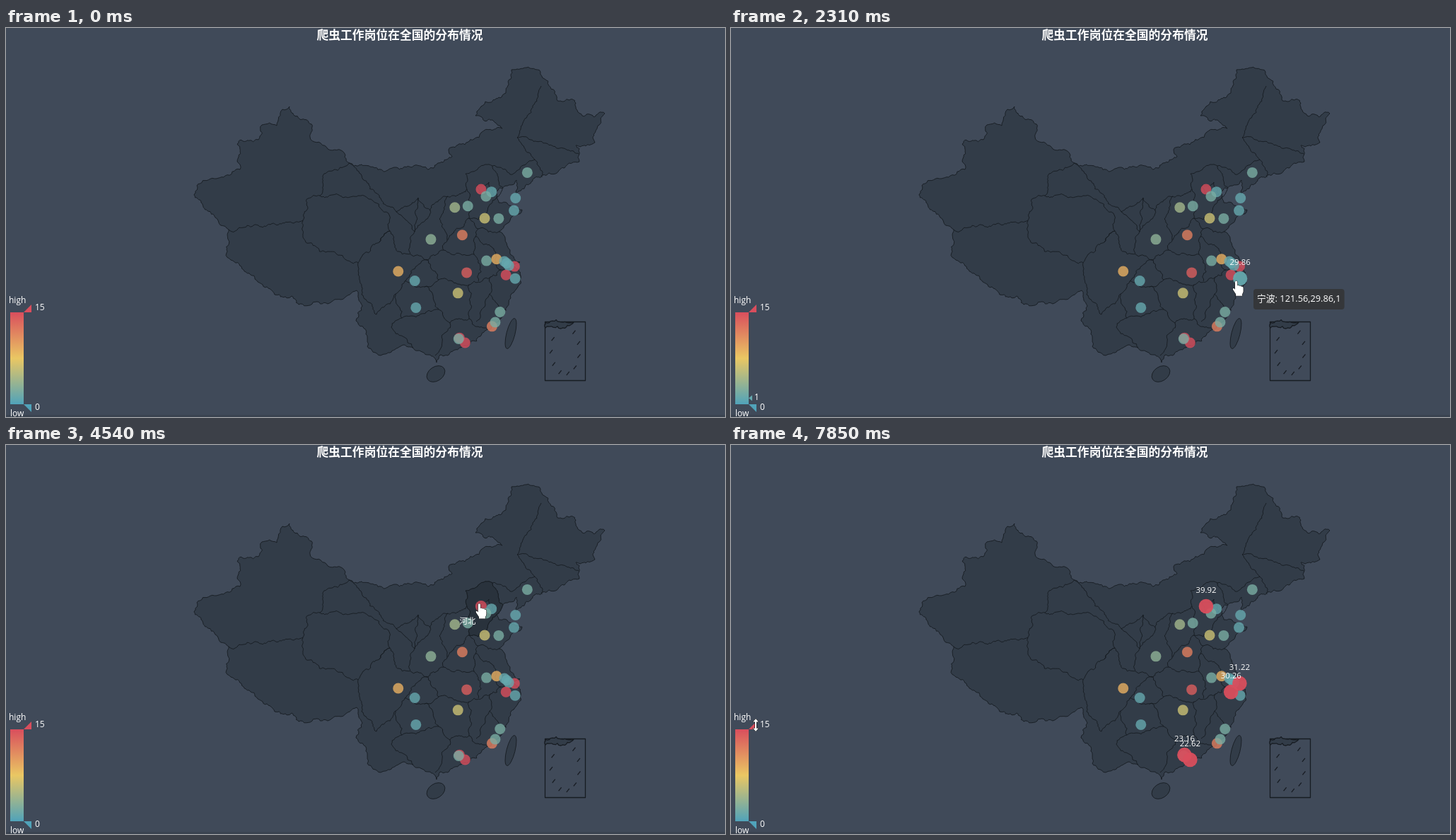
An HTML page with a canvas that plays this animation: 1017 by 550 pixels, repeating every 8000 ms.

```html
<!DOCTYPE html>
<html lang="zh">
<head>
<meta charset="utf-8">
<style>
html, body { margin: 0; width: 100%; height: 100%; overflow: hidden; background: #404a59; }
canvas { display: block; }
</style>
</head>
<body>
<canvas id="stage" width="1017" height="550"></canvas>
<script>
const W = 1017, H = 550, LOOP = 8000, STEP = 77;
const ctx = document.getElementById('stage').getContext('2d');
const SANS = '"Open Sans", "Noto Sans CJK SC", sans-serif';
const LAND = '#323c48', LAND_HOVER = '#29323c', LINE = '#171c22';

// Key points only; rough() adds the fine detail
const COAST = `266,236 270,223 310,209 331,200 327,164 357,158 362,137 383,138 391,115 401,111 408,124
433,140 430,154 474,173 486,191 540,201 605,198 631,182 626,172 662,157 672,148 702,142 690,132 664,124
678,104 707,92 715,59 736,56 756,62 779,101 806,106 815,124 847,121 832,149 833,162 806,166 811,189
768,205 721,235 722,215 693,233 697,247 730,257 697,288 727,331 718,336 728,350 724,366 700,411 671,436
614,462 609,473 598,462 562,448 530,463 511,450 509,433 495,414 504,393 496,371 455,390 414,391 404,379
380,377 318,328 312,318 315,285 296,268 276,247`;
const HEBEI = '650,206 688,195 703,226 693,241 668,271 655,269 652,228';
const CAPITAL = '667,222 683,218 690,236 672,236';
const BORDERS = [
  '486,191 450,206 444,237 427,241 420,272',
  '315,285 350,279 420,272 424,303 452,317 498,332 503,377',
  '444,237 498,237 541,262 543,287 528,303 505,320 498,332',
  '486,191 513,220 552,260 572,250 583,240 578,288 552,260',
  '583,240 600,258 625,238 652,228',
  '528,303 543,287 556,316 597,328',
  '600,258 578,288 572,319',
  '625,238 615,275 624,300 645,282 655,269 668,284 697,288',
  '624,300 619,314 597,328 612,356 655,363 685,352 700,342 718,336',
  '668,284 664,295 662,320 672,345 668,358',
  '619,314 662,320',
  '664,295 690,312 700,342',
  '597,328 564,358 592,366 612,356',
  '503,377 524,405 551,376 564,358',
  '551,376 560,410 612,398 602,373 592,366',
  '560,410 545,423 576,452',
  '612,398 628,417 607,463',
  '628,417 655,411 684,428',
  '655,363 655,411',
  '685,352 684,376 665,415',
  '684,376 708,399',
  '688,195 713,207 748,186 758,211',
  '748,186 723,155 742,158 811,179',
  '723,155 748,106 757,82'
];

const parse = s => s.split(/\s+/).map(p => p.split(',').map(Number));

// Midpoint displacement; the offset does not depend on direction
function bend(a, b, out) {
  const len = Math.hypot(b[0] - a[0], b[1] - a[1]);
  if (len < 3.5) return out.push(b);
  const [p, q] = a[0] > b[0] || (a[0] === b[0] && a[1] > b[1]) ? [b, a] : [a, b];
  const n = Math.sin(p[0] * 12.99 + p[1] * 78.23 + q[0] * 37.72 + q[1] * 9.15) * 43758.5;
  const k = (n - Math.floor(n) - 0.5) * Math.min(len * 0.45, 7) / len;
  const mid = [(p[0] + q[0]) / 2 - (q[1] - p[1]) * k, (p[1] + q[1]) / 2 + (q[0] - p[0]) * k];
  bend(a, mid, out);
  bend(mid, b, out);
}

function rough(text, closed) {
  const pts = parse(text);
  if (closed) pts.push(pts[0]);
  const out = [pts[0]], path = new Path2D();
  for (let i = 1; i < pts.length; i++) bend(pts[i - 1], pts[i], out);
  out.forEach(p => path.lineTo(p[0], p[1]));
  if (closed) path.closePath();
  return path;
}

function island(...oval) {
  const path = new Path2D();
  path.ellipse(...oval, 0, Math.PI * 2);
  return path;
}

const hebei = rough(HEBEI, true), capital = rough(CAPITAL, true);
const land = [rough(COAST, true), island(714, 432, 6, 22, 0.25), island(608, 489, 14, 10, -0.6)];
const borders = [...BORDERS.map(s => rough(s)), hebei, capital];

// Longitude, latitude, number of jobs
const cities = {
  沈阳: [123.38, 41.8, 2], 北京: [116.46, 39.92, 15], 唐山: [118.02, 39.63, 1], 天津: [117.2, 39.13, 2],
  大连: [121.62, 38.92, 1], 太原: [112.53, 37.87, 4], 石家庄: [114.48, 38.03, 2], 烟台: [121.39, 37.52, 1],
  济南: [117, 36.65, 6], 潍坊: [119.1, 36.62, 2], 西安: [108.95, 34.27, 3], 郑州: [113.65, 34.76, 12],
  成都: [104.06, 30.67, 9], 合肥: [117.27, 31.86, 2], 南京: [118.78, 32.04, 9], 上海: [121.48, 31.22, 15],
  常州: [119.95, 31.79, 1], 无锡: [120.29, 31.59, 1], 苏州: [120.62, 31.32, 1], 杭州: [120.19, 30.26, 15],
  宁波: [121.56, 29.86, 1], 武汉: [114.31, 30.52, 14], 重庆: [106.54, 29.59, 1], 长沙: [113, 28.21, 6],
  贵阳: [106.71, 26.57, 1], 福州: [119.3, 26.08, 2], 厦门: [118.1, 24.46, 12], 泉州: [118.58, 24.93, 2],
  广州: [113.23, 23.16, 15], 深圳: [114.07, 22.62, 15], 佛山: [113.11, 23.05, 2]
};
const names = Object.keys(cities);
const top15 = names.filter(n => cities[n][2] === 15);

function place(name) {
  const [lon, lat] = cities[name];
  return [679.6 + (lon - 117.27) * 9.45, 228 + (39.92 - lat) * 12.54];
}

// Hover start, end, city, pointer offset from the dot
const visits = [
  [970, 1200, '合肥', 6, -5], [1200, 1400, '南京', 3, 0], [1400, 1600, '无锡', 0, 0], [1600, 1740, '苏州', 0, 0],
  [1740, 2150, '上海', 0, 0], [2160, 2460, '宁波', -6, 3], [2760, 2830, '福州', 0, 0], [2860, 3150, '厦门', -6, 12],
  [3250, 3530, '深圳', 0, 0], [3920, 4250, '济南', 0, 0], [4530, 5100, '北京', -3, -4]
];
const legendHovers = [[6430, 7160], [7330, LOOP]];

const pointer = visits.flatMap(([from, to, name, dx, dy]) => {
  const [x, y] = place(name);
  return [[from, x + dx, y + dy], [to - 30, x + dx, y + dy]];
}).concat([
  [150, 880, 540], [880, 656, 340], [3780, 662, 250],
  [5890, 20, 394], [6000, 29, 395], [6140, 32, 394], [6440, 35, 396]
]).sort((a, b) => a[0] - b[0]);

function pointerAt(t) {
  const i = pointer.findIndex(k => k[0] > t);
  if (i < 1) return pointer[i ? pointer.length - 1 : 0].slice(1);
  const a = pointer[i - 1], b = pointer[i], k = (t - a[0]) / (b[0] - a[0]);
  return [a[1] + (b[1] - a[1]) * k, a[2] + (b[2] - a[2]) * k];
}

function elastic(k) {
  if (k <= 0) return 0;
  if (k >= 1) return 1;
  return 2 ** (-10 * k) * Math.sin((k - 0.1) * 5 * Math.PI) + 1;
}

const STOPS = [[80, 163, 186], [234, 199, 99], [217, 78, 93]];
function colour(v) {
  const p = v / 7.5, i = Math.min(1, Math.floor(p));
  return `rgb(${STOPS[i].map((c, j) => Math.round(c + (STOPS[i + 1][j] - c) * (p - i)))})`;
}

function label(c, text, x, y, size, align = 'left', weight = 500) {
  c.font = `${weight} ${size}px ${SANS}`;
  c.textAlign = align;
  c.textBaseline = 'middle';
  c.fillStyle = '#fff';
  c.fillText(text, x, y);
}

function polygon(c, text, fill) {
  c.beginPath();
  parse(text).forEach(p => c.lineTo(p[0], p[1]));
  c.closePath();
  c.fillStyle = fill;
  c.fill();
}

function drawInset(c) {
  c.lineWidth = 1.3;
  c.strokeRect(762.5, 415.5, 57, 83);
  const shore = rough('763,424 785,425 803,416 763,416', true);
  c.fill(shore);
  c.stroke(shore);
  for (let i = 0; i < 9; i++) {
    const a = -0.9 + i * 0.57;
    const x = 791 + 20 * Math.cos(a), y = 456 + 33 * Math.sin(a);
    c.beginPath();
    c.moveTo(x - 2, y + 2.5);
    c.lineTo(x + 2, y - 2.5);
    c.stroke();
  }
}

function drawLegend(c) {
  const bar = c.createLinearGradient(0, 532, 0, 402);
  STOPS.forEach((s, i) => bar.addColorStop(i / 2, `rgb(${s})`));
  c.fillStyle = bar;
  c.fillRect(6, 402, 19, 130);
  polygon(c, '25,402 36,402 36,391', colour(15));
  polygon(c, '25,532 36,532 36,543', colour(0));
  label(c, 'high', 4, 386, 12);
  label(c, 'low', 6, 546, 12);
  label(c, '15', 41, 396, 12);
  label(c, '0', 41, 537, 12);
}

function makeBase() {
  const base = document.createElement('canvas');
  base.width = W;
  base.height = H;
  const c = base.getContext('2d');
  c.fillStyle = '#404a59';
  c.fillRect(0, 0, W, H);
  c.fillStyle = '#3a4350';
  c.fillRect(0, 547, W, 3);
  c.fillStyle = LAND;
  c.strokeStyle = LINE;
  c.lineWidth = 0.9;
  c.lineJoin = 'round';
  land.forEach(p => { c.fill(p); c.stroke(p); });
  borders.forEach(p => c.stroke(p));
  drawInset(c);
  drawLegend(c);
  label(c, '爬虫工作岗位在全国的分布情况', 557, 12, 16.8, 'center', 700);
  return base;
}
const base = makeBase();

const during = (t, [from, to]) => t >= from && t < to;

function growth(t, name) {
  const spans = visits.filter(v => v[2] === name);
  if (top15.includes(name)) spans.push(...legendHovers);
  return spans.reduce((sum, [from, to]) => sum + elastic((t - from) / 400) - elastic((t - to) / 400), 0);
}

function drawDot(t, name, alpha) {
  ctx.globalAlpha = alpha;
  ctx.fillStyle = colour(cities[name][2]);
  ctx.beginPath();
  ctx.arc(...place(name), 7.5 + 2.8 * growth(t, name), 0, 7);
  ctx.fill();
  ctx.globalAlpha = 1;
}

function drawTip(t, name) {
  const text = `${name}: ${cities[name]}`;
  const [px, py] = pointerAt(t - 90);
  const x = Math.round(px + 25), y = Math.round(py + 12);
  ctx.font = `500 12.8px ${SANS}`;
  ctx.fillStyle = 'rgba(50,50,50,0.8)';
  ctx.beginPath();
  ctx.roundRect(x, y, ctx.measureText(text).width + 10, 29, 4);
  ctx.fill();
  label(ctx, text, x + 5, y + 14.5, 12.8);
}

function drawMark(value) {
  const y = 532 - 130 * value / 15;
  polygon(ctx, `25,${y} 30,${y - 4} 30,${y + 4}`, colour(value));
  label(ctx, String(value), 33, y - 0.5, 12);
}

function drawHebei() {
  ctx.strokeStyle = LINE;
  ctx.lineWidth = 0.9;
  for (const [path, fill] of [[hebei, LAND_HOVER], [capital, LAND]]) {
    ctx.fillStyle = fill;
    ctx.fill(path);
    ctx.stroke(path);
  }
}

const ARROW = new Path2D('M0 0V16L3.6 12.6L6 18L8.4 17L6 11.6H11Z');
const HAND = new Path2D('M-1.2 1.5Q.5 -1 2.2 1.5V7Q4 6 5 7.6Q7 6.8 7.8 8.5Q10.5 8 10.5 10.5V15Q10.5 17 9 19V21.5H0V19L-4 13Q-5 10.5 -2.7 10.8L-1.2 12.5Z');
const RESIZE = new Path2D('M0 -9L4 -4.5H1V4.5H4L0 9L-4 4.5H-1V-4.5H-4Z');

function drawPointer(t, x, y) {
  const overMap = ctx.isPointInPath(land[0], x, y);
  const shape = t >= 6430 ? RESIZE : overMap ? HAND : ARROW;
  ctx.save();
  ctx.translate(x, y);
  ctx.fillStyle = '#fff';
  ctx.strokeStyle = '#000';
  ctx.lineWidth = 1;
  ctx.stroke(shape);
  ctx.fill(shape);
  ctx.restore();
}

function draw(t) {
  ctx.drawImage(base, 0, 0);
  const [px, py] = pointerAt(t);
  const visit = visits.find(v => during(t, v));
  const name = visit && t >= visit[0] + (visit[2] === '北京' ? 50 : 0) ? visit[2] : null;
  const lit = name ? [name] : legendHovers.some(s => during(t, s)) ? top15 : [];
  const inHebei = !name && ctx.isPointInPath(hebei, px, py);

  if (inHebei) drawHebei();
  names.filter(n => !lit.includes(n)).forEach(n => drawDot(t, n, 0.8));
  lit.forEach(n => drawDot(t, n, 0.95));
  for (const n of lit) {
    const [x, y] = place(n);
    label(ctx, cities[n][1], x, y - 22, 11.4, 'center');
  }
  if (inHebei) label(ctx, '河北', 653, 250, 11.4, 'center');
  if (name) {
    drawMark(cities[name][2]);
    drawTip(t, name);
  }
  if (t >= 150) drawPointer(t, px, py);
}

// The screen refreshes in steps
const snap = t => t < 150 ? 0 : 150 + STEP * Math.floor((t - 150) / STEP + 0.05);

const began = performance.now();
function tick() {
  draw(snap((performance.now() - began) % LOOP));
  requestAnimationFrame(tick);
}
tick();
</script>
</body>
</html>
```
